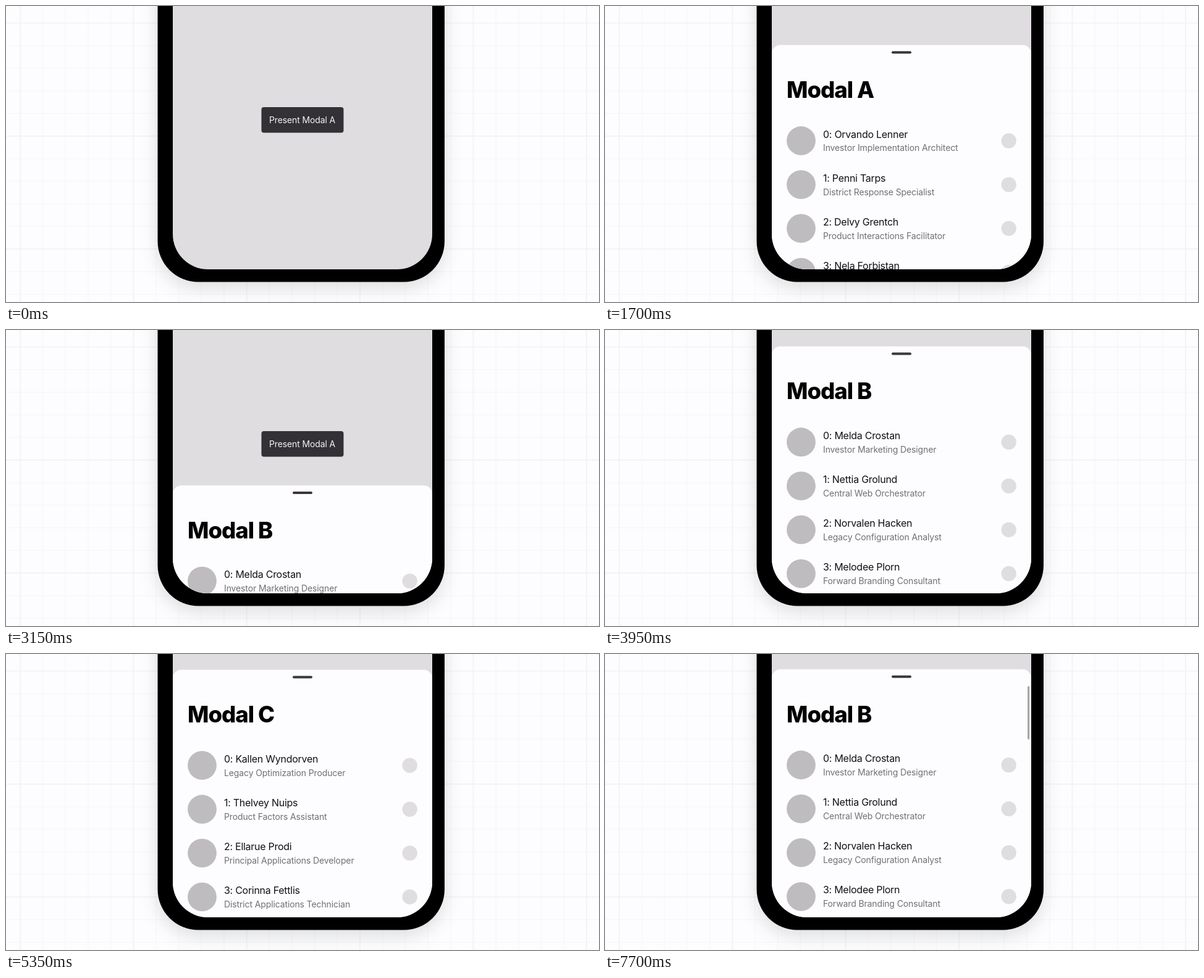
These frames come from a looping animation (960 px wide and 480 px high, 8000 ms). An HTML page:

```html
<!DOCTYPE html>
<html lang="en">
<head>
<meta charset="utf-8">
<title>Stacked modals</title>
<style>
  html, body { margin: 0; width: 100%; height: 100%; overflow: hidden; background: #fdfcfe; }
  svg { display: block; width: 100vw; height: 100vh; }
  text { font-family: Inter, Roboto, sans-serif; white-space: pre; }
  .title { font-size: 36.5px; font-weight: 800; letter-spacing: -1px; }
  .name { font-size: 16px; letter-spacing: -.27px; fill: #111012; }
  .role { font-size: 14px; letter-spacing: -.12px; fill: #706f71; }
  .label { font-size: 14px; letter-spacing: -.13px; fill: #f4f3f5; text-anchor: middle; }
  .phone { filter: drop-shadow(0 10px 14px rgba(40, 60, 60, .15)); }
</style>
</head>
<body>
<svg viewBox="0 0 960 480">
  <defs>
    <clipPath id="screen"><rect x="270" y="-200" width="420" height="627" rx="57"/></clipPath>
  </defs>
  <g id="grid"></g>
  <rect class="phone" x="245.5" y="-200" width="464.5" height="647.5" rx="66"/>
  <g clip-path="url(#screen)">
    <rect x="270" y="-10" width="420" height="440" fill="#dfdde0"/>
    <g id="button">
      <rect x="413.5" y="164" width="133" height="41.5" rx="4" fill="#333135"/>
      <text class="label" x="479.5" y="189.8">Present Modal A</text>
    </g>
    <g id="sheets"></g>
  </g>
</svg>
<script>
const LOOP = 8000, CLOSED = 428, HALF = 229, OPEN = 24.8;

const clamp01 = v => Math.max(0, Math.min(1, v));
const progress = (t, start, end) => clamp01((t - start) / (end - start));
const expOut = p => p >= 1 ? 1 : 1 - 2 ** (-10 * p);
const drag = p => p * p;

// Each move: start time, duration, from y, to y, easing
const settle = (start, from, to) => [start, 500, from, to, expOut];
const pull = (start, end, from, to) => [start, end - start, from, to, drag];

const sheets = [
  {
    title: 'Modal A',
    rows: [
      ['Orvando Lenner', 'Investor Implementation Architect'],
      ['Penni Tarps', 'District Response Specialist'],
      ['Delvy Grentch', 'Product Interactions Facilitator'],
      ['Nela Forbistan', 'Customer Research Strategist'],
    ],
    moves: [
      settle(510, CLOSED, HALF), pull(1480, 1600, HALF, 181),
      settle(1600, 181, OPEN), settle(2780, OPEN, CLOSED),
    ],
    indicator: [2230, 2500],
  },
  {
    title: 'Modal B',
    rows: [
      ['Melda Crostan', 'Investor Marketing Designer'],
      ['Nettia Grolund', 'Central Web Orchestrator'],
      ['Norvalen Hacken', 'Legacy Configuration Analyst'],
      ['Melodee Plorn', 'Forward Branding Consultant'],
    ],
    moves: [
      settle(2995, CLOSED, HALF), pull(3495, 3645, HALF, 147),
      settle(3645, 147, OPEN), settle(4280, OPEN, CLOSED),
      settle(6945, CLOSED, OPEN),
    ],
    indicator: [7470, 7700],
  },
  {
    title: 'Modal C',
    rows: [
      ['Kallen Wyndorven', 'Legacy Optimization Producer'],
      ['Thelvey Nuips', 'Product Factors Assistant'],
      ['Ellarue Prodi', 'Principal Applications Developer'],
      ['Corinna Fettlis', 'District Applications Technician'],
    ],
    moves: [
      settle(4490, CLOSED, HALF), pull(5060, 5180, HALF, 32),
      settle(5180, 32, OPEN), pull(5400, 5600, OPEN, 100),
      settle(5600, 100, HALF), pull(6630, 6945, HALF, 320),
      settle(6945, 320, CLOSED),
    ],
    indicator: [5970, 6150],
  },
];

const rowMarkup = ([name, role], i) => `
  <g transform="translate(0 ${i * 71.1})">
    <circle cx="317.5" cy="155.2" r="23.4" fill="#bebcbf"/>
    <text class="name" x="353" y="150.4">${i}: ${name}</text>
    <text class="role" x="353" y="172.2">${role}</text>
    <circle cx="653.7" cy="155.2" r="12.2" fill="#dfdde0"/>
  </g>`;

const sheetMarkup = ({ title, rows }) => `
  <g>
    <rect x="270" width="420" height="500" rx="14" fill="#fdfcfe"/>
    <rect x="464" y="10" width="32" height="4" rx="2" fill="#3a383b"/>
    <text class="title" x="294" y="85.8">${title}</text>
    ${rows.map(rowMarkup).join('')}
    <rect class="indicator" x="684.1" y="27.3" width="3" height="86.5" rx="1.5" fill="#a4a3a5"/>
  </g>`;

function gridMarkup() {
  const step = 36.67;
  let minor = '', major = '';
  for (let i = 0; i < 27; i++) {
    const x = 23 + i * step, y = 27.5 + i * step;
    const path = `M${x} 0V480` + (y < 480 ? `M0 ${y}H960` : '');
    if (i % 5) minor += path; else major += path;
  }
  return `<path d="${minor}" stroke="#f7f7f9" stroke-width="1.5"/>
    <path d="${major}" stroke="#f2f2f4" stroke-width="1.7"/>`;
}

const byId = id => document.getElementById(id);
byId('grid').innerHTML = gridMarkup();
byId('sheets').innerHTML = sheets.map(sheetMarkup).join('');
sheets.forEach((sheet, i) => {
  sheet.node = byId('sheets').children[i];
  sheet.bar = sheet.node.querySelector('.indicator');
});

function sheetY(moves, t) {
  const move = moves.filter(m => m[0] <= t).pop();
  if (!move) return CLOSED;
  const [start, duration, from, to, ease] = move;
  return from + (to - from) * ease(progress(t, start, start + duration));
}

function render(now) {
  const t = now % LOOP;
  const pressed = progress(t, 180, 330) - progress(t, 400, 650);
  byId('button').setAttribute('opacity', 1 - 0.8 * pressed);
  for (const { node, bar, moves, indicator } of sheets) {
    node.setAttribute('transform', `translate(0 ${sheetY(moves, t).toFixed(2)})`);
    bar.setAttribute('opacity', progress(t, ...indicator));
  }
}

const startTime = performance.now();
function tick() {
  render(performance.now() - startTime);
  requestAnimationFrame(tick);
}
tick();
</script>
</body>
</html>
```
